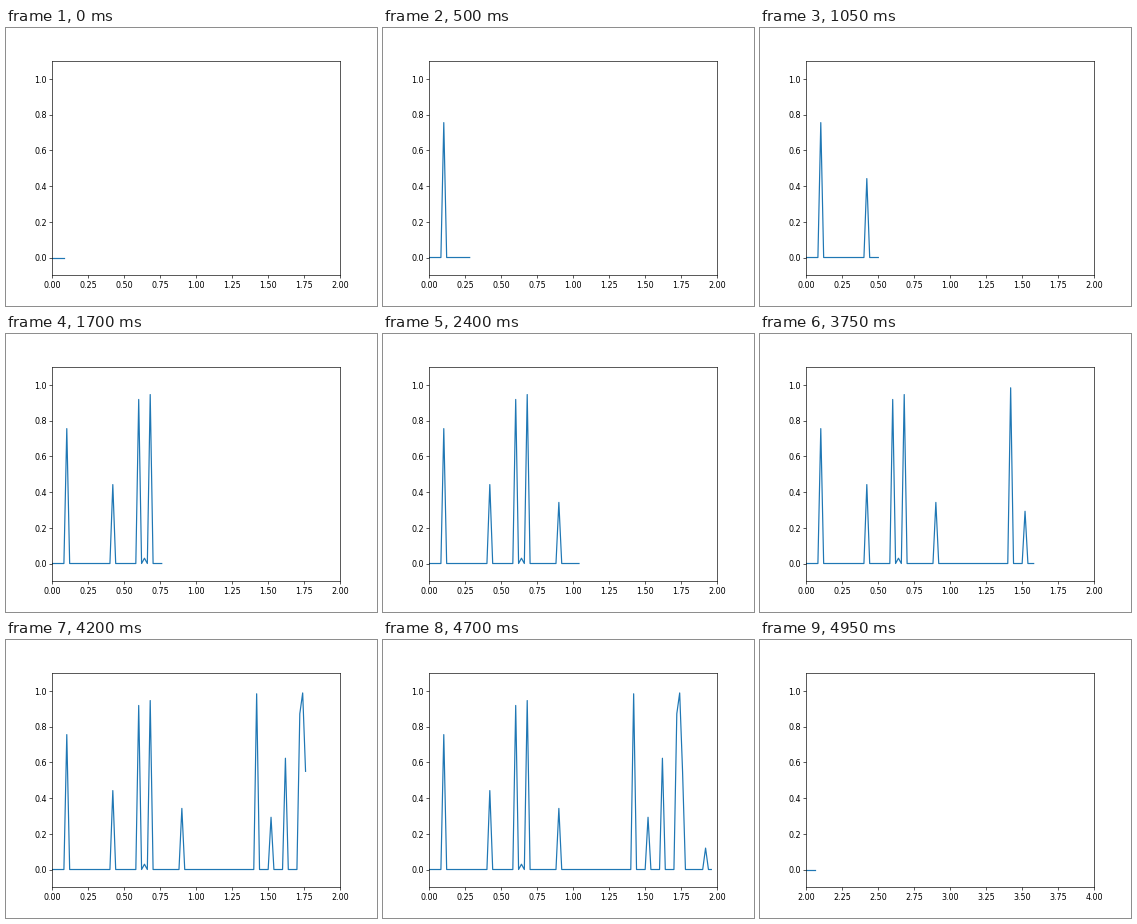
Write a matplotlib script that moves like this. It is 371 px wide and 278 px high and loops after 5 s.

```python
import numpy as np
import matplotlib.pyplot as plt
from matplotlib.animation import FuncAnimation
from matplotlib.lines import Line2D

FRAMES = 100
INTERVAL = 50      # ms
DT = 0.02          # time between samples
SPAN = 100         # samples across one sweep of the scope
LEAD = 4           # samples already taken when the loop starts

rng = np.random.RandomState(19680801 // 10)


def emit(p=0.1):
    """Return a random pulse with probability p, else zero."""
    return 0.0 if rng.rand() > p else rng.rand()


signal = np.array([0.0] + [emit() for _ in range(LEAD + FRAMES)])

# 6.4 x 4.8 inches at 58 dpi gives a canvas of 371 x 278 pixels
fig, ax = plt.subplots(figsize=(6.4, 4.8), dpi=58)
line = Line2D([], [])
ax.add_line(line)
ax.set_ylim(-0.1, 1.1)
ax.set_xlim(0, SPAN * DT)


def update(frame):
    last = LEAD + frame
    # A full sweep stays visible until the next sample arrives.
    start = (last - 1) // SPAN * SPAN
    k = np.arange(start, last + 1)
    line.set_data(k * DT, signal[k])
    ax.set_xlim(start * DT, (start + SPAN) * DT)
    return line,


anim = FuncAnimation(fig, update, frames=FRAMES, interval=INTERVAL,
                     repeat=True, repeat_delay=0, blit=False)

plt.show()
```
